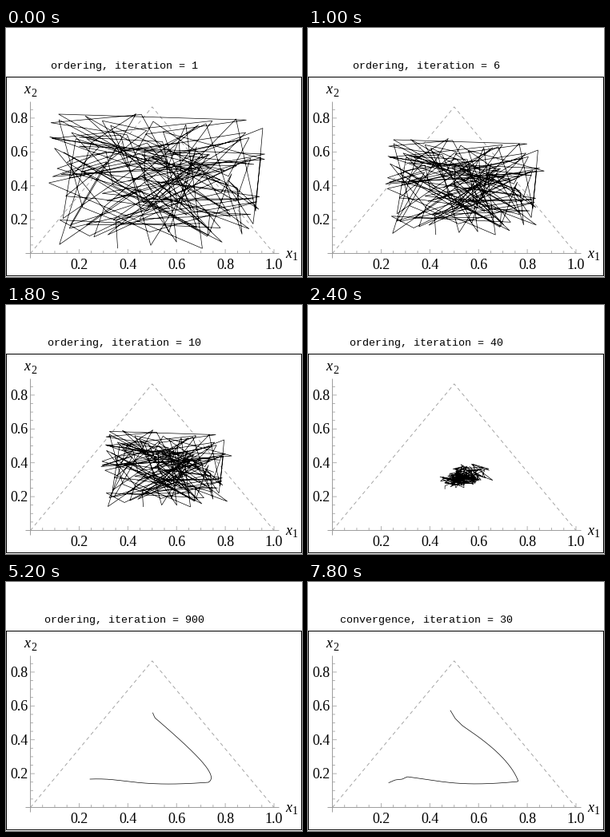
A matplotlib script for the animation above (8000 ms loop, 370 px wide and 312 px high).

```python
import numpy as np
import matplotlib.pyplot as plt
from matplotlib.animation import FuncAnimation

W, H, DPI = 370, 312, 100
PX = 72 / DPI                      # points per pixel
NODES = 150
ORIGIN = np.array([30.5, 282.5])
SCALE = np.array([304.5, -212.0])  # pixels per data unit
GREY = "0.62"

# Title and iteration number of each step
STEPS = [("ordering", n) for n in
         [*range(1, 10), *range(10, 100, 10), *range(100, 1001, 100)]]
STEPS += [("convergence", n) for n in [*range(1, 10), 10, 20, 30]]


def bezier(a, b, c, d):
    t = np.linspace(0, 1, 40)[:, None]
    a, b, c, d = map(np.array, (a, b, c, d))
    return ((1 - t) ** 3 * a + 3 * t * (1 - t) ** 2 * b
            + 3 * t ** 2 * (1 - t) * c + t ** 3 * d)


def chain(*parts):
    """Spread the nodes evenly by arc length along the joined parts."""
    p = np.vstack(parts)
    s = np.r_[0, np.cumsum(np.hypot(*np.diff(p, axis=0).T))]
    t = np.linspace(0, s[-1], NODES)
    return np.column_stack([np.interp(t, s, p[:, 0]), np.interp(t, s, p[:, 1])])


def gathered(x, y):
    return np.tile([float(x), float(y)], (NODES, 1))


arc = chain(bezier((140, 247), (180, 246), (217, 230), (217, 206)))
wide = chain(bezier((69, 251), (110, 238), (180, 258), (248, 250)),
             bezier((248, 250), (252, 232), (225, 200), (188, 165)))
hook = chain(bezier((105, 247), (150, 245), (160, 258), (253, 251)),
             bezier((253, 251), (267, 243), (238, 215), (186, 170)),
             (183.5, 164))
final = chain((101, 251.5), (109, 248), (118, 247),
              bezier((124, 244), (170, 250), (190, 257), (263, 250)),
              bezier((263, 250), (254, 225), (225, 202), (203, 187)),
              (193, 180), (184, 171), (178, 161))

# Resting shape of the chain, keyed by step
KEYS = [(0, gathered(187, 192)), (9, gathered(198, 206)), (17, arc), (21, wide),
        (26, hook), (27, 0.1 * hook + 0.9 * final), (39, final)]

rng = np.random.default_rng(8)
OFFSETS = rng.uniform((-137, -87), (137, 86), (NODES, 2))
# the far end of the chain settles more slowly
RATE = 1 - 0.35 * np.linspace(0, 1, NODES)[:, None] ** 6


def rest_shape(step):
    for (a, p), (b, q) in zip(KEYS, KEYS[1:]):
        if step <= b:
            u = (step - a) / (b - a)
            return (1 - u) * p + u * q


def nodes(step):
    phase, n = STEPS[step]
    m = n - 1 + 1000 * (phase == "convergence")
    share = np.exp(-RATE * (0.05 * m + 0.045 * np.sqrt(m)))
    return rest_shape(step) + share * OFFSETS


def to_px(x, y):
    return ORIGIN + SCALE * (x, y)


fig = plt.figure(figsize=(W / DPI, H / DPI), dpi=DPI, facecolor="white")
ax = fig.add_axes([0, 0, 1, 1])
ax.set_xlim(0, W)
ax.set_ylim(H, 0)
ax.axis("off")


def line(xs, ys, color=GREY, width=1.0, **kw):
    return ax.plot(xs, ys, color=color, lw=width * PX, snap=False, **kw)[0]


def label(x, y, text, size=18, family="Liberation Serif", **kw):
    return ax.text(x, y, text, fontsize=size * PX, family=family,
                   va="baseline", color="black", **kw)


def draw_axes():
    line([0.5, 369.5, 369.5, 0.5, 0.5], [61.5, 61.5, 310.5, 310.5, 61.5], "black",
         solid_joinstyle="miter", solid_capstyle="projecting")
    x0, y0 = ORIGIN
    corners = np.array([to_px(0, 0), to_px(0.5, 0.866), to_px(1, 0)])
    line(*corners.T, width=0.9, dashes=(5, 4.4))
    line([25, 341], [y0, y0])
    line([x0, x0], [93, 288])
    for i in range(1, 21):
        size = 5 if i % 4 == 0 else 3
        x, y = to_px(i / 20, i / 20)
        line([x, x], [y0, y0 - size], width=0.8)
        if i <= 17:
            line([x0, x0 + size], [y, y], width=0.8)
        if i % 4 == 0:
            label(x, 302, f"{i / 20:.1f}", ha="center")
            if i <= 16:
                label(27.5, y + 6, f"{i / 20:.1f}", ha="right")
    for x, y, sub in ((349.5, 288, "1"), (22.5, 82.5, "2")):
        label(x, y, "x", style="italic")
        label(x + 8.5, y + 3, sub, size=14)


draw_axes()
path = line([], [], "black", 0.68, solid_joinstyle="miter")
title = label(0, 51, "", size=13.333, family="Liberation Mono")


def draw(step):
    phase, n = STEPS[step]
    text = f"{phase}, iteration = {n}"
    title.set_text(text)
    title.set_x(148 - 4 * len(text))
    path.set_data(*nodes(step).T)
    return path, title


anim = FuncAnimation(fig, draw, frames=len(STEPS), interval=200,
                     repeat=True, repeat_delay=0)
plt.show()
```
